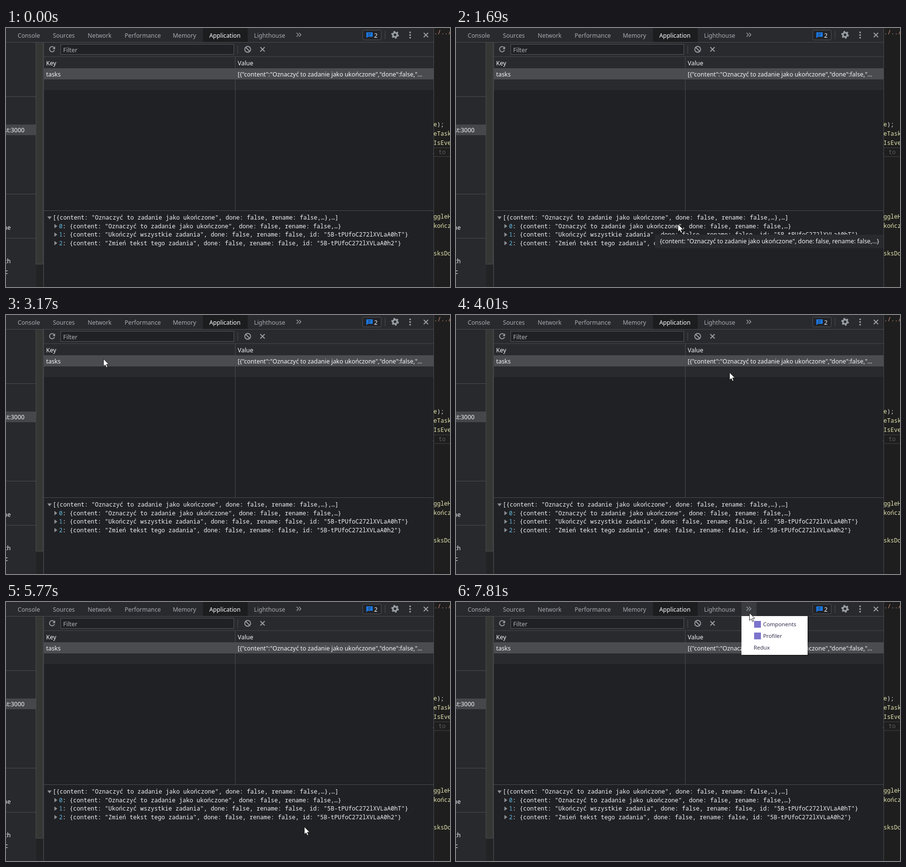
An HTML page that plays this animation: 913 by 534 pixels, repeating every 8 s.

```html
<!DOCTYPE html>
<html lang="pl">
<head>
<meta charset="utf-8">
<style>
html, body { margin: 0; width: 100%; height: 100%; overflow: hidden; background: #202124; }
svg { display: block; width: 913px; height: 534px; }
text { font: 12.4px "Noto Sans", "Open Sans", sans-serif; fill: #f2f4f6; white-space: pre; }
.tabs text { font-size: 12.2px; fill: #a6abb1; }
.tabs .on { fill: #fff; }
.mono text { font: 12.1px "Noto Sans Mono", "DejaVu Sans Mono", monospace; fill: #f0f2f4; }
.mono .num { fill: #62b8e0; }
.code text { fill: #e4e4b0; }
.menu text { font-size: 11.3px; fill: #382f50; }
.lines { stroke: #4a4c50; fill: none; }
.icon { stroke: #9aa0a6; fill: none; stroke-width: 1.8; }
</style>
</head>
<body>
<svg viewBox="0 0 913 534">
  <!-- panels -->
  <rect width="913" height="534" fill="#202124"/>
  <rect width="879" height="59" fill="#292a2d"/>
  <rect x="405" width="92" height="29" fill="#1c1d1f"/>
  <rect y="30" width="61" height="504" fill="#28292c"/>
  <rect y="199" width="61" height="22" fill="#46474a"/>
  <rect x="61" y="30" width="16" height="504" fill="#2a2b2d"/>
  <rect x="62" y="30" width="14" height="457" fill="#353735"/>
  <rect x="62" y="487" width="14" height="47" fill="#222325"/>
  <rect x="78" y="60" width="801" height="23" fill="#292a2d"/>
  <rect x="78" y="83" width="801" height="23" fill="#4b4c4f"/>
  <rect x="78" y="106" width="801" height="22" fill="#292a2d"/>
  <rect x="112.5" y="33.5" width="356" height="21" fill="#202124" stroke="#55575b"/>
  <path class="lines" d="M0 29.5H879M77.5 30V534M77 59H879M471.5 60V376M77 376.5H879M476.5 36V53M779.5 6V23M0 141.5H61M0 342.5H61M0 433.5H61M61.5 30V487H76V30"/>

  <!-- editor strip -->
  <rect x="879" width="34" height="534" fill="#1e1e1e"/>
  <path class="lines" d="M879.5 0V534"/>
  <path d="M880 247H913M880 265H913" stroke="#303030" stroke-width="2"/>
  <g class="mono code">
    <text x="880" y="13" style="fill:#d8967c">./../</text>
    <text x="879" y="203">e<tspan fill="#e0e0e0">);</tspan></text>
    <text x="879" y="222">eTask</text>
    <text x="879" y="241">IsEve</text>
    <text x="875" y="260" style="fill:#5c5d5f">. to</text>
    <text x="879" y="393">ggleH</text>
    <text x="879" y="412">kończ</text>
    <text x="879" y="469">sksDo</text>
  </g>

  <!-- top bar -->
  <rect id="hover" x="587" width="31" height="29" fill="#3a3b3f"/>
  <g class="tabs">
    <text x="24" y="20">Console</text>
    <text x="96.5" y="20">Sources</text>
    <text x="168" y="20">Network</text>
    <text x="244" y="20">Performance</text>
    <text x="343" y="20">Memory</text>
    <text x="418" y="20" class="on">Application</text>
    <text x="510" y="20">Lighthouse</text>
  </g>
  <path class="icon" style="stroke-width:1.4" d="M597.5 10l4 4l-4 4M602.5 10l4 4l-4 4"/>
  <rect x="733.5" y="4.5" width="38" height="20" rx="2" fill="#232427" stroke="#505256"/>
  <path d="M741 9H754V18H744L741 21Z" fill="#1a7bea"/>
  <path d="M744 12H751M744 15H749" stroke="#232427"/>
  <text x="757" y="20">2</text>
  <circle cx="800" cy="14" r="4.4" class="icon" style="stroke-width:3.4"/>
  <circle cx="800" cy="14" r="6.7" class="icon" style="stroke-width:2.4;stroke-dasharray:3.5 3.516"/>
  <g fill="#9aa0a6">
    <circle cx="831" cy="9" r="1.8"/><circle cx="831" cy="14.5" r="1.8"/><circle cx="831" cy="20" r="1.8"/>
  </g>
  <path class="icon" d="M859 10l9 9m0-9l-9 9M523 39.5l9 9m0-9l-9 9M492.5 39.5l9 9"/>
  <circle cx="497" cy="44" r="6" class="icon"/>
  <path class="icon" d="M99 40.5A5.3 5.3 0 1 0 99.8 45.5"/>
  <path d="M101 38V43.5H95.5Z" fill="#9aa0a6"/>

  <!-- table -->
  <text x="117.5" y="50" style="fill:#b0b3b7">Filter</text>
  <text x="82.5" y="77">Key</text>
  <text x="476.5" y="77">Value</text>
  <text x="82.5" y="100">tasks</text>
  <text x="476.5" y="100">[{"content":"Oznaczyć to zadanie jako ukończone","done":false,"…</text>
  <text x="-4" y="215">st:3000</text>
  <text x="-5" y="416">ne</text>
  <text x="-4" y="485">ch</text>
  <text x="-2" y="507">c</text>

  <!-- object preview -->
  <path d="M85 388.5h9l-4.5 6ZM99.5 404v9l6-4.5ZM99.5 421.5v9l6-4.5ZM99.5 439v9l6-4.5Z" fill="#8b9095"/>
  <g class="mono">
    <text x="96" y="395">[{content: "Oznaczyć to zadanie jako ukończone", done: false, rename: false,…},…]</text>
    <text x="109" y="413"><tspan class="num">0</tspan>: {content: "Oznaczyć to zadanie jako ukończone", done: false, rename: false,…}</text>
    <text x="109" y="430"><tspan class="num">1</tspan>: {content: "Ukończyć wszystkie zadania", done: false, rename: false, id: "5B-tPUfoC272lXVLaA0hT"}</text>
    <text x="109" y="448"><tspan class="num">2</tspan>: {content: "Zmień tekst tego zadania", done: false, rename: false, id: "5B-tPUfoC272lXVLaA0h2"}</text>
  </g>

  <g id="tip">
    <rect x="409" y="426" width="470" height="28" fill="#292a2d"/>
    <text x="419" y="444">{content: "Oznaczyć to zadanie jako ukończone", done: false, rename: false,…}</text>
  </g>
  <g id="menu" class="menu">
    <rect x="589" y="31" width="136" height="80" fill="#000" opacity=".3"/>
    <rect x="587" y="29" width="136" height="80" fill="#fff"/>
    <rect x="613" y="39" width="14" height="14" fill="#7c74cc"/>
    <rect x="613" y="63" width="14" height="14" fill="#7c74cc"/>
    <text x="631.5" y="50">Components</text>
    <text x="631.5" y="74">Profiler</text>
    <text x="612" y="98">Redux</text>
  </g>
  <path id="cursor" d="M.5 .5V16L4 12.8L6.5 18.3L9 17.2L6.6 11.8H11.5Z" fill="#fff" stroke="#111" stroke-width=".9"/>
</svg>
<script>
const LOOP = 8000, START = 1260, STEP = 70.4;
// turning points of the pointer: step, x, y
const path = [
  [-9, 783, 518], [-5, 502, 447], [0, 502, 447], [6, 456, 404], [11, 248, 304],
  [17, 139, 73], [20, 57, 100], [23, 95, 132], [27, 200, 90],
  [35, 614, 80], [39, 562, 118], [43, 530, 65], [47, 461, 308],
  [55, 49, 400], [59, 130, 449], [64, 613, 463], [66, 693, 400], [71, 57, 390],
  [82, 546, 111], [89, 603, 22]
];
const last = path.length - 1;
const $ = id => document.getElementById(id);
const show = (id, on) => $(id).style.display = on ? "" : "none";
const slope = (i, c) => (path[i + 1][c] - path[i][c]) / (path[i + 1][0] - path[i][0]);

// zero at turns and ends, so the curve never overshoots its points
function tangent(i, c) {
  if (i === 0 || i === last) return 0;
  const a = slope(i - 1, c), b = slope(i, c);
  return a * b > 0 ? 2 * a * b / (a + b) : 0;
}

function pointAt(step) {
  const k = Math.max(path[0][0], Math.min(path[last][0], step));
  const i = Math.max(0, path.findIndex(p => p[0] >= k) - 1);
  const a = path[i], b = path[i + 1], span = b[0] - a[0], u = (k - a[0]) / span;
  return [1, 2].map(c => {
    const m = tangent(i, c) * span, n = tangent(i + 1, c) * span, d = b[c] - a[c];
    return Math.round(a[c] + u * (m + u * (3 * d - 2 * m - n + u * (m + n - 2 * d))));
  });
}

function draw(now) {
  const t = now % LOOP;
  const [x, y] = pointAt(Math.floor((t - START) / STEP));
  $("cursor").setAttribute("transform", `translate(${x} ${y})`);
  show("cursor", t >= 650);
  show("tip", t >= 1610 && t < 1820);
  show("hover", t >= 7530);
  show("menu", t >= 7740);
  requestAnimationFrame(draw);
}
draw(0);
</script>
</body>
</html>
```
